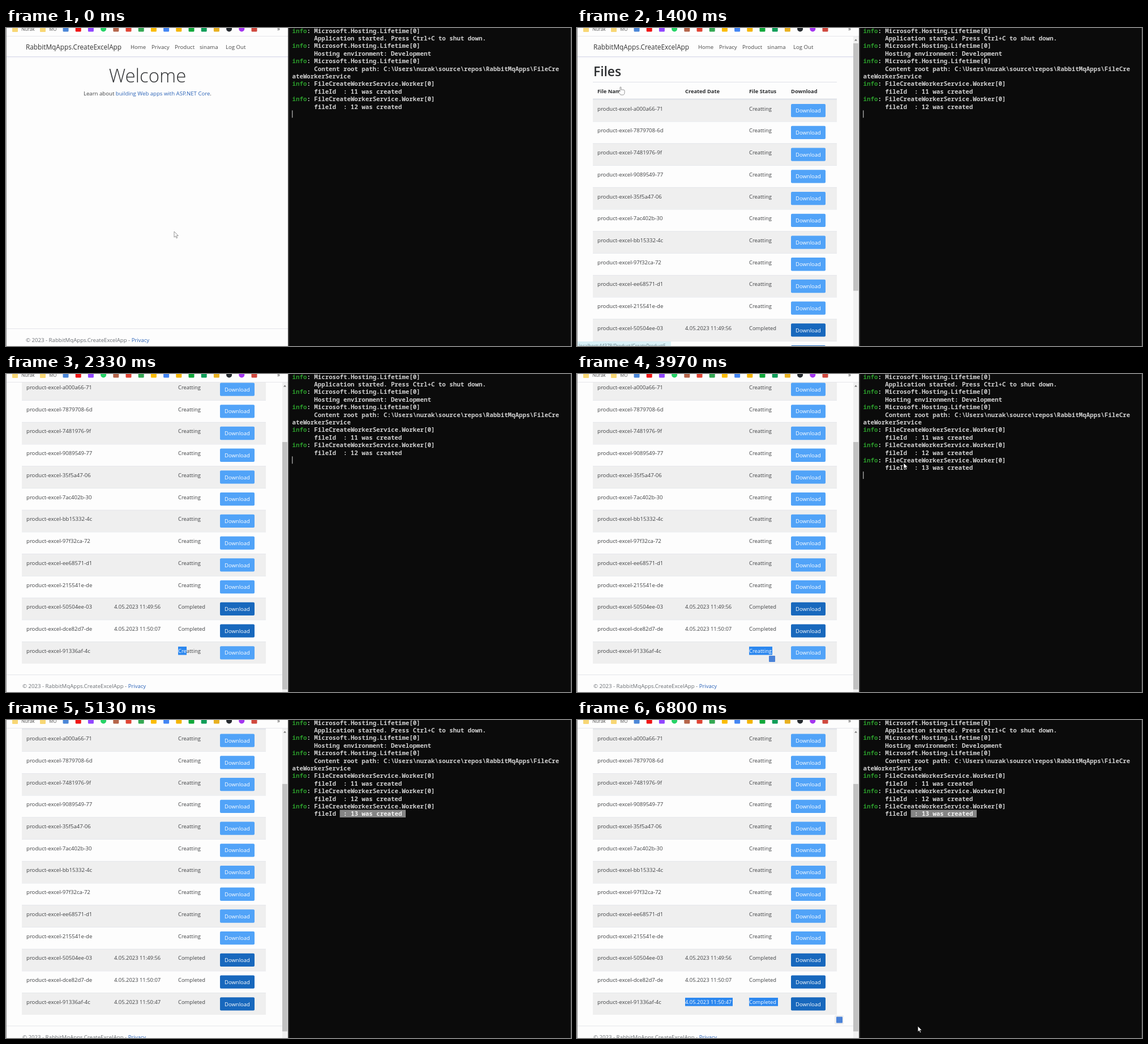
Animation, 998 px wide and 561 px high, one loop 6830 ms. Source, as an HTML page with a canvas:

```html
<!DOCTYPE html>
<html lang="en">
<head>
<meta charset="utf-8">
<title>Excel file worker demo</title>
<style>
html, body { margin: 0; width: 100%; height: 100%; overflow: hidden; background: #0c0c0c; }
canvas { display: block; }
</style>
</head>
<body>
<canvas id="stage" width="998" height="561"></canvas>
<script>
const c = document.getElementById('stage').getContext('2d');
const LOOP = 6830, ROW = 38.73, CELL = 6.47, LINE = 13.4;
const PRODUCT = 640, FILES = 1300, LOGGED = 3700, FOCUS = 4180, RELOAD = 5000;
const SANS = '"Open Sans", "Noto Sans", sans-serif';
const MONO = '"Noto Sans Mono", "DejaVu Sans Mono", monospace';
const INK = '#404244', LINK = '#2c64b8', BLUE = '#2b87ef';

const files = ['a000a66-71', '7879708-6d', '7481976-9f', '9089549-77', '35f5a47-06', '7ac402b-30', 'bb15332-4c',
  '97f32ca-72', 'ee68571-d1', '215541e-de', '50504ee-03', 'dce82d7-de', '91336af-4c'];
const dates = { 10: '4.05.2023 11:49:56', 11: '4.05.2023 11:50:07', 12: '4.05.2023 11:50:47' };
const log = [
  'info: Microsoft.Hosting.Lifetime[0]', '      Application started. Press Ctrl+C to shut down.',
  'info: Microsoft.Hosting.Lifetime[0]', '      Hosting environment: Development',
  'info: Microsoft.Hosting.Lifetime[0]',
  '      Content root path: C:\\Users\\nurak\\source\\repos\\RabbitMqApps\\FileCre', 'ateWorkerService'];
for (const id of [11, 12, 13])
  log.push('info: FileCreateWorkerService.Worker[0]', `      fileId  : ${id} was created`);

const icons = ['#4a86d8', '#f01414', '#9146ff', '#25d366', '#b5654a', '#e04434', '#34a853', '#fbbc04',
  '#4285f4', '#f4b400', '#10a83a', '#0f9d58', '#e8b020', '#24292e', '#a435f0', '#d0483e'];
const round = new Set([3, 13, 14]);

// time, x, y, pointer shape from then on (a: arrow, h: hand, -: none)
const path = [
  [0, 297, 359, 'a'], [150, 297, 359, 'a'], [480, 314, 36, 'h'], [640, 314, 36, 'a'],
  [950, 77, 104, 'h'], [1430, 77, 104, 'a'], [1650, 130, 250, 'a'], [2100, 304, 486, '-'],
  [2250, 304, 488, '-'], [2330, 319, 488, '-'], [2450, 345, 490, '-'], [2850, 346, 490, 'a'],
  [3400, 580, 148, 'a'], [3700, 580, 148, 'a'], [3970, 577, 157, 'a'], [4180, 706, 165, 'a'],
  [4450, 590, 168, 'a'], [4560, 574, 170, 'a'], [4650, 574, 170, 'a'], [4950, 420, 300, '-'],
  [5850, 191, 497, '-'], [6350, 455, 520, '-'], [6480, 455, 520, 'a'], [6800, 602, 540, 'a'],
  [LOOP, 602, 540, 'a']];
const shapes = {
  a: new Path2D('M0 0V10.2L2.4 8 4 11.8 5.7 11.1 4.1 7.4H7.3Z'),
  h: new Path2D('M-1 7V1a1 1 0 0 1 2 0V5H5q2 0 2 2V10q0 3-2 4H0Q-1 13-4 8q1-1.5 3 0Z')
};

const ease = k => k * k * (3 - 2 * k);
const ramp = (t, a, b) => ease(Math.min(1, Math.max(0, (t - a) / (b - a))));

function rect(x, y, w, h, color) {
  c.fillStyle = color;
  c.fillRect(x, y, w, h);
}

function text(s, x, y, size, color = INK, weight = 400, font = SANS) {
  c.font = `${weight} ${size}px ${font}`;
  c.fillStyle = color;
  c.fillText(s, x, y);
  return x + c.measureText(s).width;
}

function box(x, y, w, h, r, color) {
  c.fillStyle = color;
  c.beginPath();
  c.roundRect(x, y, w, h, r);
  c.fill();
}

function clipped(x, y, w, h, draw) {
  c.save();
  c.beginPath();
  c.rect(x, y, w, h);
  c.clip();
  draw();
  c.restore();
}

function pointerAt(t) {
  const i = path.findIndex(p => p[0] > t) - 1;
  const [t0, x0, y0, shape] = path[i], [t1, x1, y1] = path[i + 1], k = ramp(t, t0, t1);
  return { x: x0 + (x1 - x0) * k, y: y0 + (y1 - y0) * k, shape };
}

function bookmarks() {
  rect(0, 0, 498, 14, '#fdfdfd');
  for (const [x, name] of [[11, 'Nurak'], [60, 'MU']]) {
    box(x, -3, 5, 4, 1, '#e9bd52');
    box(x, -1, 10, 8, 1, '#f8d775');
    text(name, x + 16, 5, 8.4, '#555');
  }
  icons.forEach((color, i) => box(100.5 + i * 22.2, -3.5, 10, 10, round.has(i) ? 5 : 1.5, color));
  text('»', 479, 5, 10, '#444');
  rect(0, 14, 498, 1, '#e6e6ea');
}

function nav(x, y) {
  text('RabbitMqApps.CreateExcelApp', x, y + 37.5, 11.8, '#333');
  [['Home', 185], ['Privacy', 222], ['Product', 263], ['sinama', 307], ['Log Out', 353]]
    .forEach(([s, dx]) => text(s, x + dx, y + 36.7, 9.6, '#484848'));
  rect(1, y + 50, 497, 1, '#d9daea');
  rect(1, y + 51, 497, 2, '#f5f5f9');
}

function footer(x, y) {
  rect(1, y, 497, 1, '#e4e5ea');
  const end = text('© 2023 - RabbitMqApps.CreateExcelApp - ', x, y + 23.5, 9.65, '#6c7075');
  text('Privacy', end, y + 23.5, 9.5, LINK);
}

function welcome() {
  c.textAlign = 'center';
  text('Welcome', 250, 96, 33, '#303234', 300);
  c.textAlign = 'left';
  const x = text('Learn about ', 137, 118.5, 9.6);
  text('.', text('building Web apps with ASP.NET Core', x, 118.5, 9.6, LINK), 118.5, 9.6);
}

// Cell text with the part between its start and `to` highlighted
function marked(s, x, y, end, to, gray) {
  text(s, x, y, 9.4);
  const w = Math.min(to, end) - x;
  if (w > 0) clipped(x, y - 11, w, 15, () => {
    rect(x, y - 11, w, 15, gray ? '#b9b9b9' : BLUE);
    text(s, x, y, 9.4, gray ? INK : '#fff');
  });
}

function table(t, y, px) {
  text('Files', 29, y + 84.5, 22.8, '#2c2e30', 600);
  rect(28, y + 95, 431, 1, '#dfe2e8');
  [['File Name', 36], ['Created Date', 191], ['File Status', 304], ['Download', 378]]
    .forEach(([s, x]) => text(s, x, y + 114.5, 9.3, '#2c2e30', 700));
  rect(28, y + 124.5, 431, 1.5, '#dfe2e8');
  files.forEach((id, i) => {
    const top = y + 126 + i * ROW, base = top + 19.6, last = i === 12;
    const done = i === 10 || i === 11 || last && t >= RELOAD;
    if (i % 2 === 0) rect(28, top, 431, ROW, '#efefef');
    rect(28, top, 431, .8, '#e2e4e9');
    text('product-excel-' + id, 36, base, 9.6);
    const to = !last ? 0 : t >= RELOAD ? (t > 5850 ? px : 0) : t > 2200 ? px : 0;
    if (done) marked(dates[i], 191, base, 275, to);
    marked(done ? 'Completed' : 'Creatting', 304, base, done ? 355 : 345, to, t > FOCUS && t < RELOAD);
    box(378, top + 8, 61, 23.3, 2, done ? '#1868bd' : '#51a3f8');
    text('Download', 386, top + 23.3, 9.5, '#fff');
  });
}

function scrollbar(scroll) {
  rect(488, 15, 10, 546, '#f1f1f1');
  rect(488, 27 + scroll * .784, 9, 436.5, '#c1c1c1');
  c.fillStyle = '#777';
  c.fill(new Path2D('M490 22.5 492.5 19.5 495 22.5Z'));
}

// Drop shadow of the focused terminal window on the page
function shadow() {
  const g = c.createLinearGradient(478, 0, 498, 0);
  g.addColorStop(0, 'rgba(0,0,0,0)');
  g.addColorStop(.5, 'rgba(0,0,0,.1)');
  g.addColorStop(1, 'rgba(0,0,0,.45)');
  rect(478, 0, 20, 561, g);
}

function browser(t, px) {
  rect(0, 0, 498, 561, '#fdfdfd');
  const scroll = t >= RELOAD ? 109.5 : 118.6 * ramp(t, 1500, 1750);
  if (t < FILES) {
    nav(35, 0);
    if (t < PRODUCT) welcome();
    footer(35, 530);
  } else {
    nav(29, -scroll);
    table(t, -scroll, px);
    footer(29, 648.8 - scroll);
    scrollbar(scroll);
  }
  if (t > 950 && t < 1430) {
    rect(0, 553, 166, 8, '#d9f0f6');
    text('localhost:44378/Product/CreateProductE', 3, 564, 8.1, '#6d8790');
  }
  if (t > 2850 && t < RELOAD) box(339, 497, 11, 11, 1, '#4a82d8');
  if (t > 6430) {
    box(455, 521, 16, 16, 2, '#eeeeee');
    box(458, 523.5, 11, 11, 1, '#4a82d8');
  }
  bookmarks();
  if (t > FOCUS && t < RELOAD) shadow();
  rect(0, 0, 1, 561, '#8c8c8c');
}

function terminal(t, px) {
  rect(498, 0, 500, 561, '#0b0b0b');
  rect(498, 0, 2, 561, '#3c3c3c');
  rect(997, 0, 1, 561, '#3c3c3c');
  const count = t < LOGGED ? 11 : 13;
  const put = (s, col, row, color) => text(s, 505.5 + col * CELL, 8.6 + row * LINE, CELL / .6, color, 600, MONO);
  log.slice(0, count).forEach((s, row) => {
    const info = s.startsWith('info');
    if (info) put('info', 0, row, '#2a9a2a');
    put(info ? s.slice(4) : s, info ? 4 : 0, row, '#d0d0d0');
  });
  if (t < FOCUS) {
    rect(505.3, 145.3 + (count - 11) * LINE, 1, 13, '#ddd');
    return;
  }
  const col = t > 4450 ? 13 : Math.max(13, Math.round((px - 505.5) / CELL));
  const x = 505.5 + col * CELL;
  rect(x, 158.5, 706 - x, 13.4, '#858585');
  put(log[12].slice(col), col, 12, '#f2f2f2');
}

function pointer({ x, y, shape }) {
  if (shape === '-') return;
  c.save();
  c.translate(x, y);
  c.fillStyle = '#fff';
  c.strokeStyle = x > 498 ? '#111' : '#7c7c7c';
  c.lineWidth = .8;
  c.fill(shapes[shape]);
  c.stroke(shapes[shape]);
  c.restore();
}

const start = performance.now();
function frame() {
  const t = (performance.now() - start) % LOOP, p = pointerAt(t);
  browser(t, p.x);
  terminal(t, p.x);
  pointer(p);
  requestAnimationFrame(frame);
}
frame();
</script>
</body>
</html>
```
